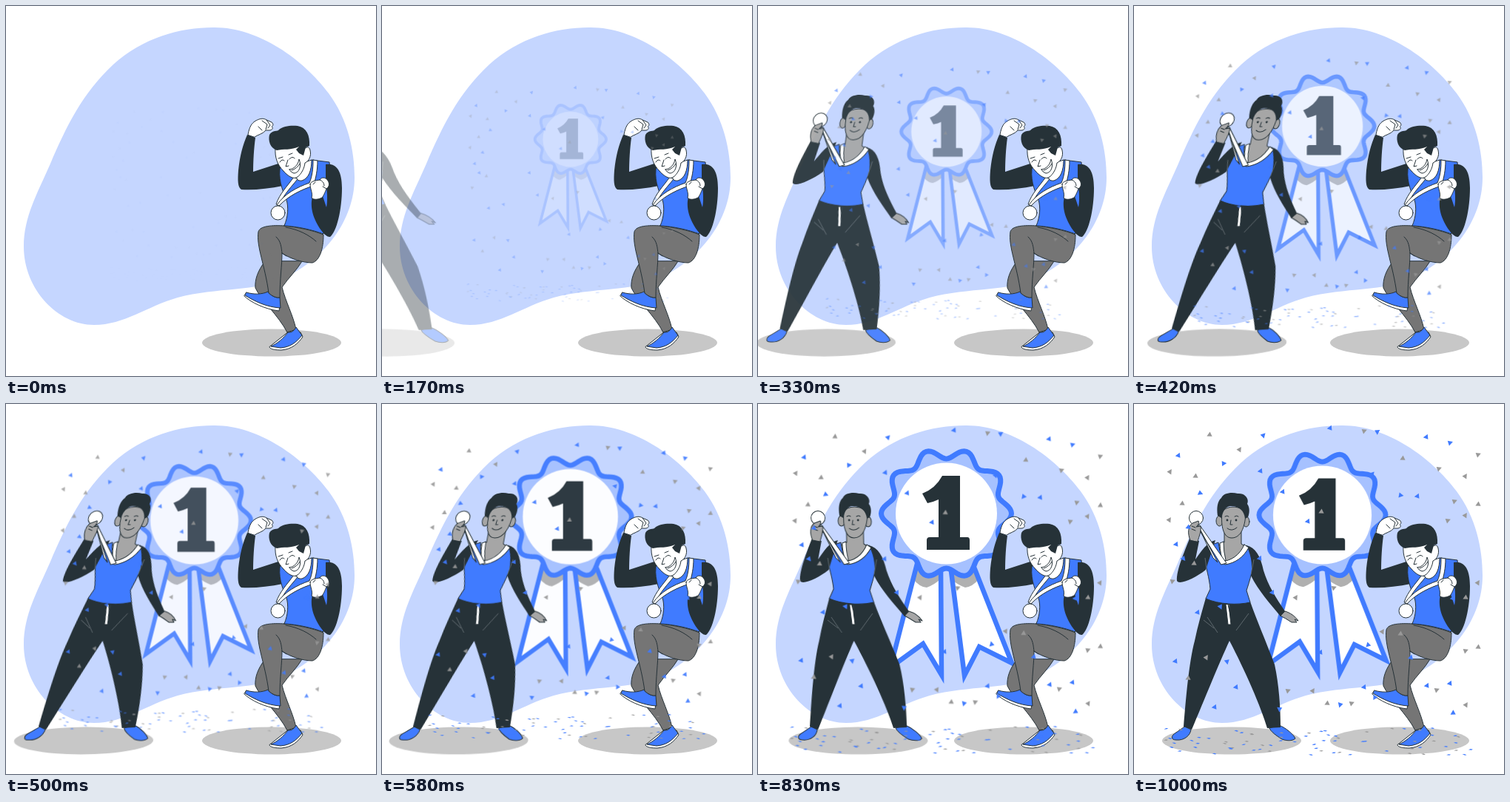
These frames come from a looping animation (500 px wide and 500 px high, 1.04 s). An HTML page:

```html
<!DOCTYPE html>
<html lang="en">
<head>
<meta charset="utf-8">
<title>Winners</title>
<style>
  html, body { margin: 0; width: 100%; height: 100%; overflow: hidden; background: #fff; }
  svg { display: block; width: 100%; height: 100%; }
  .dark { fill: #263238; }
  .blue { fill: #407bff; }
  .skin { fill: #a6a6a6; }
  .pants { fill: #757575; }
  .white { fill: #fff; }
  .shade { fill: #c7c7c7; }
  .ink { stroke: #263238; stroke-width: 1; stroke-linejoin: round; stroke-linecap: round; }
  .line { fill: none; }
  .fold { fill: none; stroke: #6d767b; stroke-width: .8; }
  .edge { fill: none; stroke: #407bff; stroke-width: 6.5; stroke-miterlimit: 6; }
  #award { transform-origin: 255px 219px; }
  #woman { transform-origin: 0 290px; }
  #confetti { transform-origin: 254px 257px; }
</style>
</head>
<body>
<svg viewBox="0 0 500 500">
  <defs>
    <path id="tails" d="M217 208L179 356L223 324L248 366L247 218ZM260 218L279 367L299 328L343 350L287 208Z"/>
    <path id="bit" d="M-3.6 2.6L3.6 2.8L.6 -3.6Z"/>
    <path id="flake" d="M-3 .2L0 -.8L3 0L1 .9Z"/>
  </defs>

  <path fill="#c5d6ff" d="M280 29C340 28 402 72 436 118C462 153 471 195 471 232C471 290 430 342 375 368C340 386 285 380 232 394C190 406 160 431 119 431C70 431 24 383 24 325C24 285 42 254 60 213C81 164 103 118 145 79C185 43 235 29 280 29Z"/>

  <g id="award">
    <use href="#tails" class="white"/>
    <path fill="#b0b0b0" d="M209 236Q219 248 228 248Q239 244 247 236V212H216ZM260 236Q269 244 280 248Q290 247 299 236L290 212H260Z"/>
    <use href="#tails" class="edge"/>
    <path id="rosette" class="edge" style="fill:#a6c1ff;stroke-width:7"/>
    <circle cx="254.5" cy="148" r="68.5" class="white"/>
    <path aria-label="1" class="dark" d="M249 97H273V180H283Q286 180 286 184V197H228V184Q228 180 232 180H244V129Q238 132 229 134L222 121Q240 114 249 97Z"/>
  </g>

  <g id="woman">
    <ellipse class="shade" cx="132" cy="455" rx="94" ry="18.5"/>
    <path class="blue ink" d="M69 436L77 440C76 448 68 455 57 454C50 454 50 449 54 446Z"/>
    <path class="blue ink" d="M183 438L196 434C206 438 216 447 218 452C214 456 205 455 200 453C192 448 185 443 183 438Z"/>
    <path class="skin ink" d="M198 286L204 280C211 282 218 287 222 293L217 291L220 295H213L205 290Z"/>
    <path class="skin ink" d="M122 170V187L112 192Q118 214 130 215Q144 212 151 193L145 189V170Z"/>
    <path class="dark" d="M97 262C112 270 142 271 157 267C165 290 178 320 190 352C196 380 198 410 198 437L180 438C172 410 150 360 129 320C115 350 95 400 78 440L67 436C70 400 74 350 82 320C86 300 92 280 97 262Z"/>
    <path class="blue ink" d="M106 190L114 187Q117 213 128 215Q143 212 152 191L163 204C162 220 156 240 152 252L157 268C140 272 115 271 97 263L103 250C102 235 97 222 95 205Z"/>
    <path class="dark" d="M110 184C98 187 91 199 83 210L88 185L75 182C68 200 57 225 58 239C61 245 82 236 97 224Z"/>
    <path class="dark" d="M152 191C164 194 171 205 175 225C181 245 192 262 204 280L198 287C184 270 168 252 158 232C160 222 160 208 152 191Z"/>
    <path class="fold" d="M96 208L98 222M162 210L158 230M99 288L113 309M94 292L108 303M155 283L138 306"/>
    <path class="white ink" d="M124 271L127 298H131L128 271ZM127 271L130 284L129 271Z"/>
    <path class="white ink" d="M121 186L116 188C116 198 118 207 121 214L124 211Q121 200 121 186ZM149 190L155 194C148 207 137 215 123 217L117 213C132 212 143 204 149 190Z"/>
    <path class="white ink" d="M84 163L89 164L125 215L118 217ZM86 163L113 214L107 208Z"/>
    <circle class="white ink" cx="84" cy="154" r="9.5"/>
    <path class="skin ink" d="M76 184C72 175 73 165 79 161L87 158C89 161 86 164 84 166L90 165C91 173 88 178 86 186Z"/>
    <path class="ink line" d="M78 165L83 167M78 169L83 171"/>
    <ellipse class="skin ink" cx="115.500" cy="158" rx="4.500" ry="7"/>
    <ellipse class="skin ink" cx="151.500" cy="159" rx="4.500" ry="7"/>
    <path class="skin ink" d="M119 146C117 166 121 181 132 181C144 181 150 167 151 148C146 137 125 136 119 146Z"/>
    <path class="dark" d="M113 151C111 138 114 130 118 127C121 120 132 119 140 121C150 120 156 128 153 135C157 140 156 148 154 153L150 155C149 144 142 138 131 138C124 138 120 145 118 154Z"/>
    <circle class="dark" cx="126" cy="157" r="1.400"/>
    <circle class="dark" cx="138" cy="157" r="1.400"/>
    <path class="ink line" d="M123 152Q126 150 128 152M136 152Q139 150 141 152M131 157L130 163H133M126 168Q132 173 139 167"/>
  </g>

  <g id="man">
    <ellipse class="shade" cx="359" cy="455" rx="94" ry="18.500"/>
    <path class="pants ink" d="M350 345C340 358 336 370 337 381C345 398 368 418 380 441L392 437C388 418 378 400 373 380C382 367 393 357 400 345Z"/>
    <path class="white ink" d="M381 441L398 441L401 447C395 456 386 464 372 465C364 465 357 464 356 461Z"/>
    <path class="blue ink" d="M381 441Q388 442 392 434L400 445C392 455 384 461 371 462L358 460C367 456 375 449 381 441Z"/>
    <path class="white ink" d="M325 388L370 404L369 412C350 410 330 400 322 392Z"/>
    <path class="blue ink" d="M325 387C334 390 346 390 354 386Q361 395 370 394L371 408C352 407 336 399 323 391Z"/>
    <path class="pants ink" d="M376 297C360 296 343 297 341 305C338 325 350 350 355 388Q363 395 370 394C370 370 373 350 373 334C385 342 402 347 414 347C424 344 429 328 429 309C414 303 395 299 376 297Z"/>
    <path class="ink line" d="M365 312C372 318 372 327 373 334M378 299C395 302 409 309 419 318M373 334L379 338"/>
    <path class="dark" d="M326 174L337 178C335 192 334 210 334 224L371 212L374 243C355 247 335 249 318 248C313 245 313 235 314 222C316 202 320 188 326 174Z"/>
    <path class="white ink" d="M327 174C328 168 330 160 336 156C342 152 348 151 352 154L359 157C362 160 361 162 359 163C362 165 359 168 356 168L351 168C347 173 340 174 336 177Z"/>
    <path class="ink line" d="M346 155L353 160L351 167M352 154L357 161L354 165M341 163L346 168"/>
    <path class="blue ink" d="M371 215L385 226L413 208L437 211C440 240 435 275 429 308C412 302 394 298 376 297C381 285 382 272 379 262C373 248 367 232 371 215Z"/>
    <path class="white ink" d="M390 226L404 211L413 208C413 222 409 233 400 236C394 237 391 233 390 226Z"/>
    <path class="white ink" d="M389 231L394 234C385 245 376 254 369 269L365 268C370 253 380 244 389 231Z"/>
    <path class="white ink" d="M415 208L421 209C421 221 419 233 415 243C400 248 382 256 369 270L366 269C376 254 393 245 410 239C414 230 415 219 415 208Z"/>
    <circle class="white ink" cx="367.500" cy="279.500" r="9.500"/>
    <path class="dark" d="M432 214C446 212 454 222 454 246C454 275 447 305 438 312C430 313 417 292 414 278C412 268 413 262 414 258L428 257L433 272C435 262 434 250 432 238Z"/>
    <path class="white ink" d="M411 241C412 236 419 236 424 235C426 231 432 231 435 236C438 241 436 245 433 247C431 252 429 257 427 259C421 262 415 262 413 259C415 253 411 248 411 241Z"/>
    <path class="ink line" d="M424 235Q430 237 430 243M415 241L418 238M433 247L428 244"/>
    <path class="white ink" d="M364 192C363 205 367 215 375 223C381 230 389 235 394 231C399 227 403 220 404 212C409 210 413 203 411 195C410 189 405 190 402 195L396 186Z"/>
    <path class="dark" d="M366 195C357 192 354 182 356 174C360 167 367 170 369 167C374 162 386 161 394 162C406 164 411 175 410 189L405 191L402 202L396 199L392 194L396 190C386 195 374 193 366 195Z"/>
    <path class="white ink" d="M383 221C390 220 395 214 396 207C400 216 396 226 389 226Q385 225 383 221Z"/>
    <path class="ink line" d="M381 208L378 217L382 216M386 222Q393 220 397 213"/>
    <path class="ink line" stroke-width="1.500" d="M370 211Q373 206 376 209M383 207Q387 202 390 206M368 206L374 204M382 201L387 199"/>
  </g>

  <g id="confetti"></g>
</svg>
<script>
  const $ = id => document.getElementById(id);
  const STEPS = 25, LOOP = 1040;

  // Ten soft lobes around the medallion
  const lobes = Array.from({ length: 180 }, (_, i) => {
    const a = i * Math.PI / 90, r = 81 + 7 * Math.cos(10 * a);
    return (254.5 + r * Math.cos(a)).toFixed(1) + ' ' + (148 + r * Math.sin(a)).toFixed(1);
  });
  $('rosette').setAttribute('d', 'M' + lobes.join('L') + 'Z');

  const blueBits = [
    [175,43],[265,32],[329,38],[395,44],[427,53],[60,69],[121,81],[171,90],[360,124],[383,124],
    [89,121],[201,118],[73,167],[57,189],[66,209],[86,281],[116,274],[56,347],[125,348],[138,382],
    [196,412],[109,409],[278,406],[311,382],[325,396],[252,335],[316,325],[427,377],[431,417],[396,380],
    [374,342],[431,262],[187,254],[235,158],[322,94],[170,208]];
  const greyBits = [
    [102,41],[311,37],[143,62],[363,73],[465,69],[49,92],[83,97],[412,88],[448,98],[65,134],
    [433,132],[448,151],[465,135],[424,158],[48,157],[81,215],[52,240],[98,343],[73,370],[208,388],
    [242,388],[261,404],[294,405],[336,308],[360,310],[448,334],[449,407],[465,328],[409,387],[465,242],
    [448,261],[270,249],[219,262],[253,145]];

  const put = (shape, fill, x, y, turn) =>
    `<use href="#${shape}" fill="${fill}" transform="translate(${x} ${y}) rotate(${turn})"/>`;
  const BLUE = '#407bff', GREY = '#999';

  let seed = 11;
  const rand = () => (seed = (seed * 16807) % 2147483647) / 2147483647;
  const floor = Array.from({ length: 76 }, (_, i) =>
    put('flake', i % 3 ? BLUE : GREY, 43 + 412 * rand(), 438 + 36 * rand(), 30 * rand() - 15));

  $('confetti').innerHTML = [
    ...blueBits.map(([x, y], i) => put('bit', BLUE, x, y, i % 2 ? 20 : 160 + i * 7)),
    ...greyBits.map(([x, y], i) => put('bit', GREY, x, y, [0, 185, 150][i % 3])),
    ...floor].join('');

  // Rows hold a step number, then the values of the pose; the whole loop moves in equal steps
  const play = (id, rows, pose) => $(id).animate(
    rows.map(([step, ...v]) => ({ offset: step / STEPS, ...pose(...v) })),
    { duration: LOOP, iterations: Infinity, easing: `steps(${STEPS})`, delay: -4, fill: 'both' });

  const grow = (scale, opacity) => ({ transform: `scale(${scale})`, opacity });
  const lean = (x, skew, opacity) => ({ transform: `translateX(${x}px) skewX(${skew}deg)`, opacity });

  play('award', [[0, .4, 0], [4, .547, .2], [8, .694, .48], [10, .797, .68], [14, .94, .95],
    [17, .987, 1], [20, 1, 1], [24, .972, 1], [25, .965, 1]], grow);
  play('confetti', [[0, .53, .02], [4, .654, .32], [8, .763, .55], [10, .817, .72], [14, .899, .92],
    [17, .952, 1], [20, .988, 1], [24, 1, 1], [25, 1, 1]], grow);
  play('woman', [[0, -300, 24, .02], [4, -150, 7.6, .4], [8, -18, -7.6, .93], [10, 14, -11.6, 1],
    [12, 8, -12, 1], [14, 1, -10.1, 1], [17, 0, -3.6, 1], [20, 0, 1.2, 1], [24, 0, 0, 1], [25, 0, 0, 1]], lean);
</script>
</body>
</html>
```
